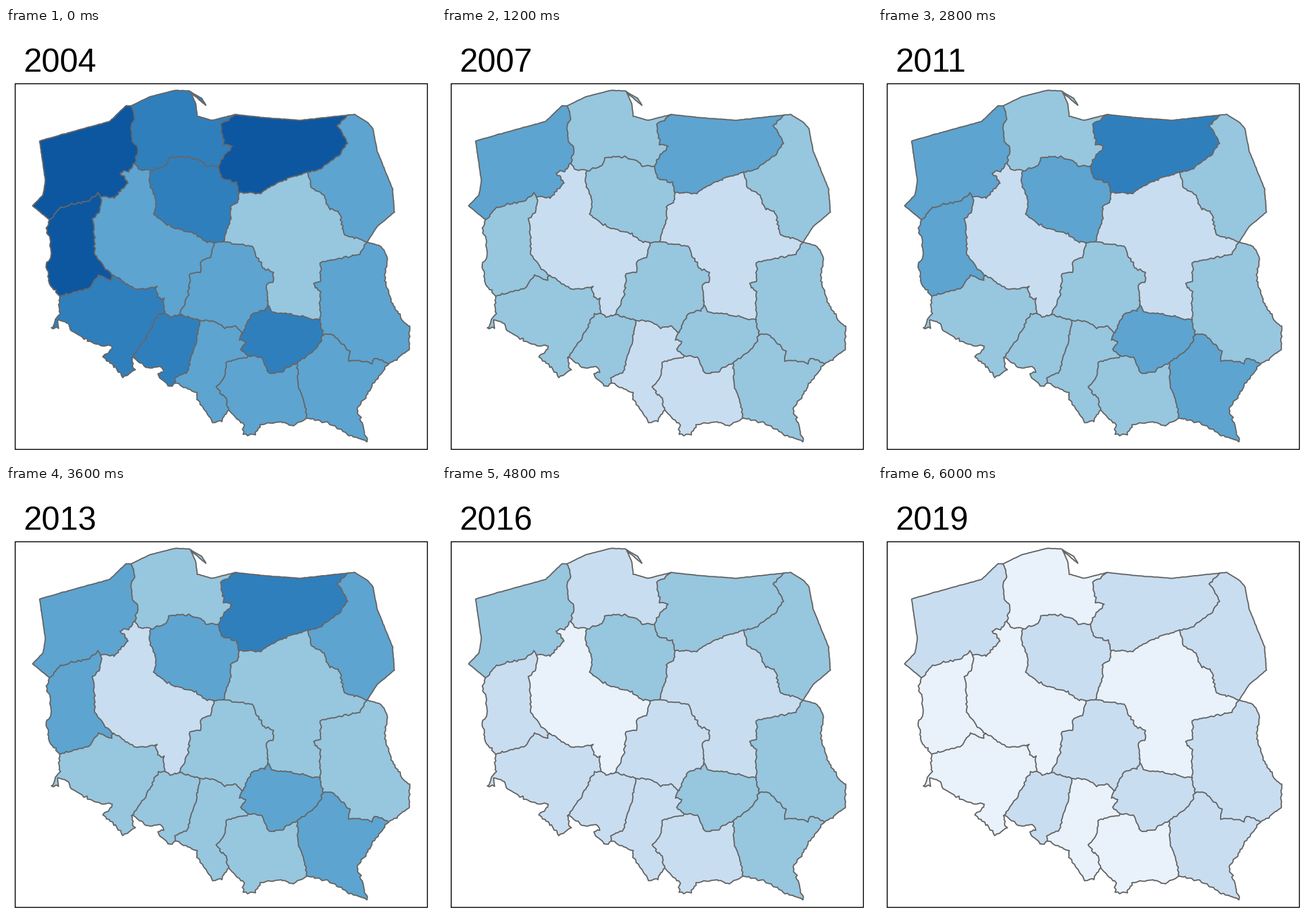
A matplotlib script that plays this animation: 748x748 px, repeating every 6.4 s.

```python
import numpy as np
import matplotlib.pyplot as plt
from matplotlib.animation import FuncAnimation
from matplotlib.patches import Polygon, Rectangle

SIZE = 748
DPI = 100
PX = 72 / DPI  # points per pixel
FIRST_YEAR = 2004
BAND = 5  # percent per shade
BORDER = "#666666"
SHADES = ["#E9F1FA", "#C9DDF0", "#97C6DF", "#5DA4D0", "#2F7FBD", "#0D57A1"]

# Country-wide rate for each year
RATES = [19.5, 17.6, 14.9, 11.2, 9.7, 12.1, 12.4, 12.7,
         13.2, 13.2, 11.4, 9.8, 8.5, 6.6, 5.8, 5.15]

# Regional rate relative to the country, at even steps from first to last year
TRENDS = {
    "ZP": (1.45, 1.45), "PM": (1.08, 0.83), "WM": (1.61, 1.76),
    "PD": (0.87, 1.32), "LB": (1.395, 0.967), "WP": (0.82, 0.505),
    "KP": (1.2, 1.41), "MZ": (0.765, 0.785), "LD": (0.92, 1.1),
    "LU": (0.985, 1.23), "DS": (1.18, 0.925), "OP": (1.027, 1.027),
    "SL": (0.861, 0.7485), "SK": (1.25, 1.27), "MP": (0.83, 0.785),
    "PK": (0.99, 1.38, 1.1),
}

# Key points (x, y pairs) of each border, keyed by the regions it bounds
ARCS = {
    # outer border
    "ZP": [75, 333, 46, 309, 64, 290, 68, 266, 58, 196, 100, 184, 180, 162,
           208, 135, 217, 135],
    "PM": [217, 135, 250, 119, 292, 108, 318, 109, 340, 122, 347, 134, 321, 112,
           330, 132, 332, 153, 358, 160, 398, 150],
    "WM": [398, 150, 455, 156, 512, 160, 594, 151],
    "PD": [594, 151, 606, 150, 630, 165, 638, 175, 645, 213, 672, 280, 675, 320,
           645, 345, 628, 372],
    "LU": [628, 372, 652, 380, 663, 398, 658, 438, 669, 472, 690, 510, 702, 518,
           700, 560, 665, 584],
    "PK": [665, 584, 636, 622, 611, 662, 619, 688, 628, 718, 596, 708,
           560, 687, 523, 678],
    "MP": [523, 678, 497, 692, 480, 685, 443, 690, 432, 707, 412, 706,
           413, 690, 387, 664],
    "SL": [387, 664, 374, 682, 360, 685, 333, 648, 331, 634, 294, 617],
    "OP": [294, 617, 283, 623, 264, 602, 274, 598, 268, 588, 250, 592, 218, 573],
    "DS": [218, 573, 223, 595, 202, 608, 190, 590, 169, 573, 185, 554, 160, 552,
           113, 527, 108, 514, 90, 507, 91, 521, 78, 521, 92, 497, 93, 466],
    "LB": [93, 466, 75, 446, 70, 412, 78, 396, 76, 362, 69, 355, 75, 333],
    # borders between two regions
    "ZP PM": [217, 135, 224, 155, 217, 170, 220, 198, 229, 207, 224, 234],
    "ZP LB": [75, 333, 94, 312, 144, 299, 160, 287, 164, 294],
    "ZP WP": [164, 294, 188, 295, 212, 269, 197, 252, 210, 249, 224, 234],
    "PM WP": [224, 234, 230, 245, 252, 248],
    "PM KP": [252, 248, 278, 238, 283, 227, 306, 222, 338, 230, 345, 239, 369, 240],
    "PM WM": [398, 150, 374, 167, 377, 202, 393, 205, 376, 224, 369, 240],
    "KP WM": [369, 240, 373, 261, 400, 268, 405, 286],
    "WM MZ": [405, 286, 441, 287, 476, 267, 524, 250],
    "WM PD": [594, 151, 576, 170, 594, 200, 575, 225, 545, 246, 524, 250],
    "PD MZ": [524, 250, 530, 275, 552, 292, 562, 314, 578, 318, 588, 359, 628, 372],
    "MZ LU": [628, 372, 615, 392, 547, 408, 546, 440, 533, 444, 545, 458, 546, 507],
    "KP MZ": [405, 286, 402, 304, 390, 309, 389, 332, 378, 371],
    "KP WP": [252, 248, 249, 268, 262, 303, 256, 324, 290, 347, 330, 358,
              345, 371, 361, 373],
    "KP LD": [361, 373, 378, 371],
    "MZ LD": [378, 371, 428, 380, 446, 415, 463, 425, 464, 442, 452, 445, 455, 481],
    "MZ SK": [455, 481, 462, 493, 486, 496, 530, 505, 546, 507],
    "SK LU": [546, 507, 551, 534],
    "LU PK": [551, 534, 568, 532, 598, 562, 594, 577, 635, 582, 641, 573, 665, 584],
    "SK PK": [551, 534, 540, 557, 506, 582],
    "PK MP": [506, 582, 508, 625, 516, 640, 523, 678],
    "SK MP": [506, 582, 475, 599, 455, 600, 444, 572, 421, 570],
    "SK SL": [421, 570, 408, 558, 417, 546, 405, 540, 412, 529],
    "SK LD": [412, 529, 426, 496, 450, 492, 455, 481],
    "MP SL": [421, 570, 383, 582, 379, 606, 365, 625, 383, 645, 387, 664],
    "LD SL": [336, 508, 366, 511, 379, 522, 397, 518, 412, 529],
    "OP SL": [336, 508, 330, 545, 322, 572, 316, 597, 294, 608, 294, 617],
    "LD OP": [301, 498, 336, 508],
    "WP OP": [276, 496, 284, 502, 301, 498],
    "WP LD": [361, 373, 355, 398, 340, 403, 337, 424, 320, 428, 317, 463, 301, 498],
    "DS OP": [276, 496, 264, 498, 240, 545, 218, 573],
    "WP DS": [187, 430, 225, 455, 261, 450, 264, 467, 274, 470, 276, 496],
    "LB DS": [93, 466, 115, 460, 148, 450, 160, 428, 183, 440, 187, 430],
    "LB WP": [164, 294, 162, 320, 151, 331, 154, 395, 172, 417, 187, 430],
}
SMOOTH = {"ZP", "PM", "WM", "PD"}

rng = np.random.default_rng(7)


def roughen(flat, amount):
    """Subdivide an arc and wobble everything but its two ends."""
    pts = np.reshape(flat, (-1, 2)).astype(float)
    out = [pts[:1]]
    for a, b in zip(pts[:-1], pts[1:]):
        n = max(1, round(np.hypot(*(b - a)) / 4))
        out.append(np.linspace(a, b, n + 1)[1:])
    line = np.vstack(out)
    line[1:-1] += rng.normal(0, amount, (len(line) - 2, 2))
    return line


def outline(region):
    """Chain the arcs of a region into one closed ring."""
    parts = [line for key, line in lines.items() if region in key.split()]
    ring = parts.pop(0)
    while parts:
        i = next(i for i, p in enumerate(parts)
                 if np.allclose(p[0], ring[-1]) or np.allclose(p[-1], ring[-1]))
        part = parts.pop(i)
        if not np.allclose(part[0], ring[-1]):
            part = part[::-1]
        ring = np.vstack([ring, part[1:]])
    return ring


def shade(region, year):
    trend = TRENDS[region]
    share = np.interp(year, np.linspace(0, len(RATES) - 1, len(trend)), trend)
    return SHADES[min(int(RATES[year] * share / BAND), len(SHADES) - 1)]


lines = {key: roughen(flat, 0.2 if key in SMOOTH else 1.0)
         for key, flat in ARCS.items()}

fig = plt.figure(figsize=(SIZE / DPI, SIZE / DPI), dpi=DPI, facecolor="white")
ax = fig.add_axes([0, 0, 1, 1])
ax.set_xlim(-0.5, SIZE - 0.5)
ax.set_ylim(SIZE - 0.5, -0.5)
ax.axis("off")

shapes = {region: ax.add_patch(Polygon(outline(region), lw=0))
          for region in TRENDS}
for line in lines.values():
    ax.plot(*line.T, color=BORDER, lw=2.2 * PX,
            solid_joinstyle="round", solid_capstyle="round")
ax.add_patch(Rectangle((15.5, 96.5), 717, 636, fill=False, ec="black",
                       lw=1.6 * PX, snap=False))
label = ax.text(29.2, 75.8, "", family="Liberation Sans", size=57 * PX,
                color="black", va="baseline")


def draw(year):
    label.set_text(str(FIRST_YEAR + year))
    for region, shape in shapes.items():
        shape.set_facecolor(shade(region, year))
    return [label, *shapes.values()]


anim = FuncAnimation(fig, draw, frames=len(RATES), interval=400, repeat=True,
                     repeat_delay=0, blit=False)
plt.show()
```
